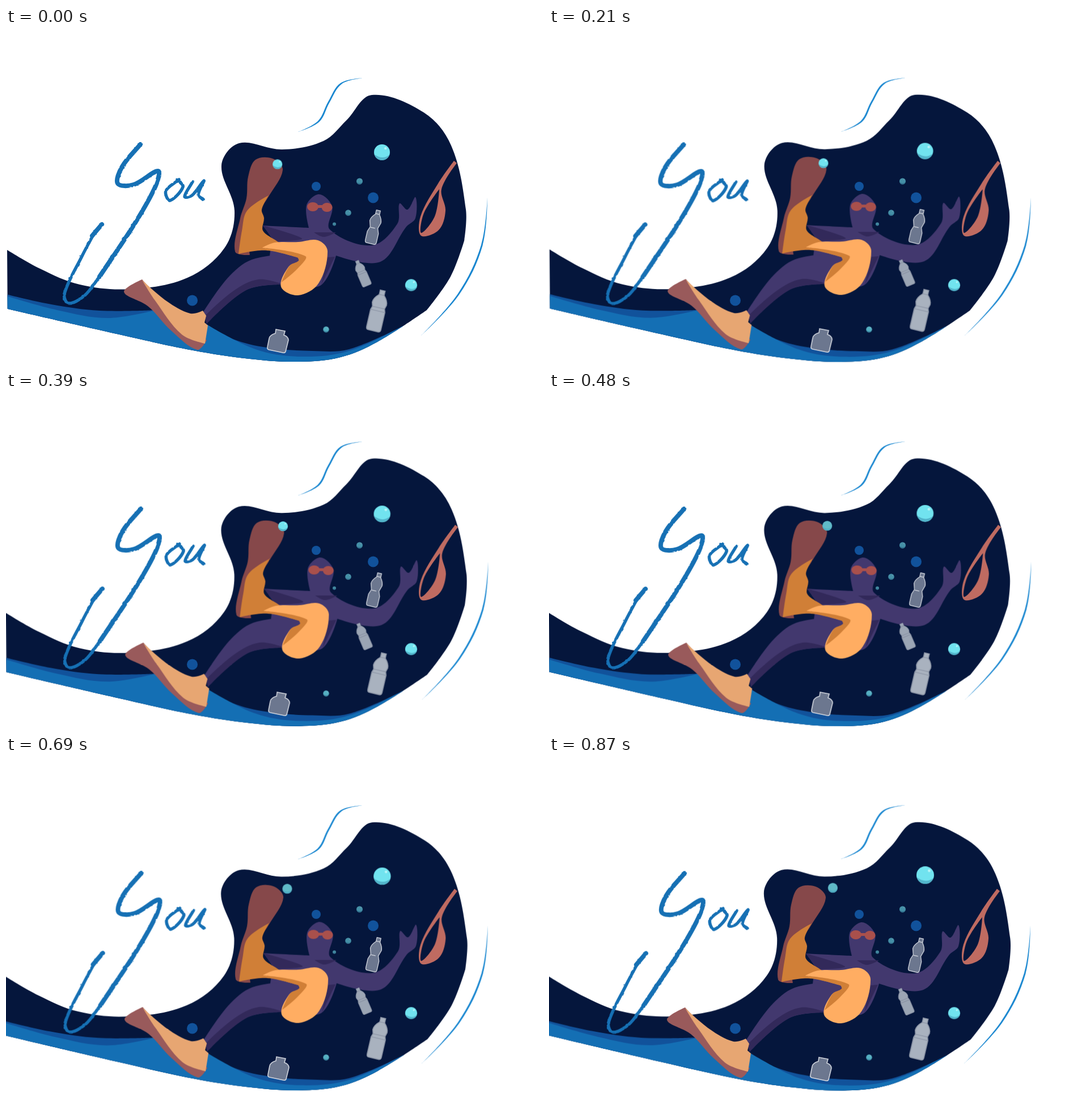
An HTML page for the animation above (900 ms loop, 947 px wide and 592 px high).

```html
<!DOCTYPE html>
<html lang="en">
<head>
<meta charset="utf-8">
<title>You</title>
<style>
  html, body { margin: 0; width: 100%; height: 100%; overflow: hidden; background: #fff; }
  svg { display: block; width: 947px; height: 592px; }
  .navy { fill: #05163c; }
  .mid { fill: #11529b; }
  .blue { fill: #146fb4; }
  .line { fill: #1a87d0; }
  .skin { fill: #42386e; }
  .dusk { fill: #32295a; }
  .brush { fill: none; stroke: #146fb4; stroke-width: 8; stroke-linecap: round; stroke-linejoin: round; }
  .thin { stroke-width: 5.5; }
  .glass { fill: #6c778f; stroke: #d3d7df; stroke-width: 1.6; }
  .cloudy { fill: #a9b2bf; stroke: #8790a2; stroke-width: 1.6; }

  /* there and back */
  .sway { animation: sway .9s linear infinite; }
  @keyframes sway { 48% { transform: var(--to); } 97%, 100% { transform: none; } }
  .swimmer { --to: translate(2.6px, -1.6px); }
  .litter { --to: translate(2.4px, -2.4px); }
  .arc { --to: translate(1.6px, .5px); }
  .mask { --to: skewX(-1.1deg); transform-origin: 735px 362px; }

  /* one way, then a jump back */
  .go { animation: go .9s linear infinite; }
  @keyframes go { to { transform: var(--to); } }
  .sea { --to: matrix(1.008, .007, 0, 1.008, 0, 0); transform-origin: 510px 400px; }
  .crest { --to: translate(-.5px, -1.5px); }
  .letters { --to: translate(2px, 1.7px); }
  .rise { --to: translate(.5px, -9.5px) scale(1.11); transform-origin: 663px 219px; }
  .drift { --to: translate(22.5px, -8px); }
  .drift circle { animation: dim .9s step-end infinite; }
  @keyframes dim { 53% { fill: #60bac8; } }
</style>
</head>
<body>
<svg viewBox="0 0 947 592" role="img" aria-label="You">
  <defs>
    <filter id="rough" x="-5%" y="-5%" width="110%" height="110%">
      <feTurbulence type="fractalNoise" baseFrequency=".12" numOctaves="2" seed="4"/>
      <feDisplacementMap in="SourceGraphic" scale="2.5" xChannelSelector="R" yChannelSelector="G"/>
    </filter>
    <clipPath id="inside"><use href="#wave"/></clipPath>
    <g id="bottle">
      <path d="M-4,-37h9v8q8,8 8,16l-2,7 2,6v31q0,5-4,5h-18q-4,0-4,-5v-31l2,-6-2,-7q0,-8 9,-16z"/>
      <path d="M-5,-29h11M-11,-6h22M-13,0h26" fill="none" opacity=".6"/>
    </g>
    <g id="flask">
      <path d="M-4,-38h9v9q7,9 7,17l-4,13 4,11v19q0,6-4,6h-17q-4,0-4,-6v-19l4,-11-4,-13q0,-8 9,-17z"/>
      <path d="M-4,-30h9M-8,2h10" fill="none"/>
    </g>
  </defs>

  <g class="sea go">
    <path id="wave" class="navy" data-p="2,391! 60,424 130,452 220,460 320,440 385,388 403,322 380,242 411,203 487,214 560,199 600,163 645,118 737,149 785,207 811,320 808,375! 784,438 742,497! 655,553 590,580 516,588 430,583 330,568 200,540 3,495!"/>
    <g clip-path="url(#inside)">
      <path class="mid" data-p="0,469! 80,487 165,498 262,497! 352,521! 400,548 460,563 540,569 605,566 700,525! 700,600! 0,600!"/>
      <path class="blue" data-p="0,472! 90,497 180,511 264,497! 352,521! 440,566 520,579 605,569 700,525! 700,600! 0,600!"/>
    </g>
  </g>

  <path class="line crest go" data-taper="515,183 550,164 568,130 590,97 631,88"/>
  <path class="line arc sway" data-taper="849,298 838,382 797,468 732,542"/>

  <g class="letters go"><g class="brush" filter="url(#rough)">
    <path data-line="237,205 205,244 197,274 225,276 268,252 264,278 228,343 165,438"/>
    <path class="thin" data-line="165,438 138,472 110,485 103,468 134,402 158,357"/>
    <path data-line="152,366 169,346"/>
    <path class="thin" data-line="305,267 282,287 289,304 312,280 302,267"/>
    <path class="thin" data-line="329,271 315,297 328,295 349,269 339,294 348,302"/>
  </g></g>

  <g class="swimmer sway">
    <path class="skin" data-p="453,348! 534,352! 530,312 552,293 575,314 571,355 645,383 690,345 694,309 708,320 722,298 722,335 706,350 660,412 582,401! 552,455 470,440 470,372!"/>
    <path class="dusk" data-p="453,348! 522,371 474,376!"/>
    <path class="dusk" data-p="543,360! 582,360! 560,368"/>
    <path class="dusk" data-p="567,404! 580,403! 556,452!"/>
    <path class="skin" data-p="348,500! 395,436 440,406 520,405 495,452! 425,461 354,521!"/>
    <path class="dusk" data-p="354,521! 350,508! 400,464 445,443 490,452! 425,461"/>
    <g fill="#a9504c">
      <ellipse cx="541" cy="315" rx="10" ry="8"/>
      <ellipse cx="566" cy="316" rx="9.5" ry="8"/>
      <path d="M545,312h16v5h-16z"/>
    </g>
    <path fill="#86484a" data-p="427,262 440,232 470,230 488,250 463,297 430,350 430,400! 404,394 413,335 424,300"/>
    <path fill="#d07f37" data-p="463,295! 425,322 416,357 410,398! 460,392 525,408! 474,373! 453,357 455,335 451,320"/>
    <path fill="#ffad62" data-p="452,387! 474,378 515,377 550,374 567,393 551,450 515,471 485,456 498,421 518,410 515,403!"/>
    <path fill="#d07f37" data-p="452,387! 528,402 514,424 486,448! 500,419 516,410 514,404!"/>
    <path fill="#995a5b" data-p="240,443! 208,465 250,490 291,533 337,567 354,550! 280,485"/>
    <path fill="#e7a672" data-p="240,444! 283,481 325,503 347,498! 353,507! 350,519! 356,524! 351,556! 310,540 262,479"/>
  </g>

  <g class="mask sway">
    <path fill="#bf6b61" data-p="790,234! 762,274 731,332 732,366 763,356 775,322 768,284 795,238!"/>
    <path class="navy" data-p="764,284! 737,326 732,361 756,332"/>
  </g>

  <g class="litter sway">
    <use href="#flask" class="glass" transform="translate(649.5 351) rotate(13) scale(.8)"/>
    <use href="#bottle" class="cloudy" opacity=".92" transform="translate(628 432.5) rotate(-23) scale(.65)"/>
    <use href="#bottle" class="cloudy" transform="translate(655.5 498.5) rotate(13)"/>
    <path class="glass" d="M476,531l16,3-2,7q8,3 8,9l-5,20q-1,3-5,2l-24,-5q-4,-1-3,-5l3,-15q1,-6 11,-9z"/>
  </g>

  <g id="bubbles"></g>
</svg>

<script>
  const parse = text => text.split(' ').map(word => {
    const [x, y] = word.split(',').map(parseFloat);
    return { x, y, sharp: word.endsWith('!') };
  });

  // Smooth curve through the points; sharp ones become corners.
  function curve(pts, open) {
    const n = pts.length;
    const at = i => open ? pts[Math.max(0, Math.min(n - 1, i))] : pts[(i + n) % n];
    const gap = (a, b) => Math.hypot(a.x - b.x, a.y - b.y);
    const handle = (i, side) => {
      const p = at(i), a = at(i - 1), b = at(i + 1);
      const k = p.sharp ? 0 : side * gap(p, at(i + side)) / (gap(a, p) + gap(p, b)) / 2.8;
      return `${p.x + (b.x - a.x) * k},${p.y + (b.y - a.y) * k}`;
    };
    let d = `M${pts[0].x},${pts[0].y}`;
    for (let i = 0; i < n - (open ? 1 : 0); i++) {
      d += `C${handle(i, 1)} ${handle(i + 1, -1)} ${at(i + 1).x},${at(i + 1).y}`;
    }
    return open ? d : d + 'Z';
  }

  // Thin sliver: out along one side, back along the other.
  function taper(pts) {
    const back = pts.slice(1, -1).reverse().map(p => ({ x: p.x + 2.5, y: p.y + 1.2 }));
    pts[0].sharp = pts.at(-1).sharp = true;
    return curve([...pts, ...back]);
  }

  for (const path of document.querySelectorAll('path')) {
    const { p, line, taper: sliver } = path.dataset;
    const d = p ? curve(parse(p)) : line ? curve(parse(line), true) : sliver && taper(parse(sliver));
    if (d) path.setAttribute('d', d);
  }

  function bubble(x, y, r, move = '', opacity = 1) {
    return `<g class="${move}"><g transform="translate(${x} ${y}) scale(${r / 10})" opacity="${opacity}">
      <circle r="10" fill="#71e3ef"/>
      <path d="M-9.6,2.6A10,10 0 0 0 9.4,3.2Q1,10-9.6,2.6Z" fill="#4ba9c2" opacity=".8"/>
      <circle cx="4.5" cy="-5" r="1.6" fill="#b6f4f8"/></g></g>`;
  }
  const dot = (x, y, r) => `<circle class="mid" cx="${x}" cy="${y}" r="${r}"/>`;

  document.getElementById('bubbles').innerHTML = [
    dot(547, 279, 8), dot(647.5, 299, 9.5), dot(328.5, 480, 9.5),
    bubble(623.5, 270, 5.5, '', .6), bubble(603.5, 325.5, 5.3, '', .6),
    bubble(579, 345.5, 3, '', .55), bubble(564.5, 531, 5.2, '', .75),
    bubble(714.5, 453, 10.6),
    bubble(663, 219, 14, 'rise go'), bubble(478.7, 240, 8.6, 'drift go')
  ].join('');
</script>
</body>
</html>
```
